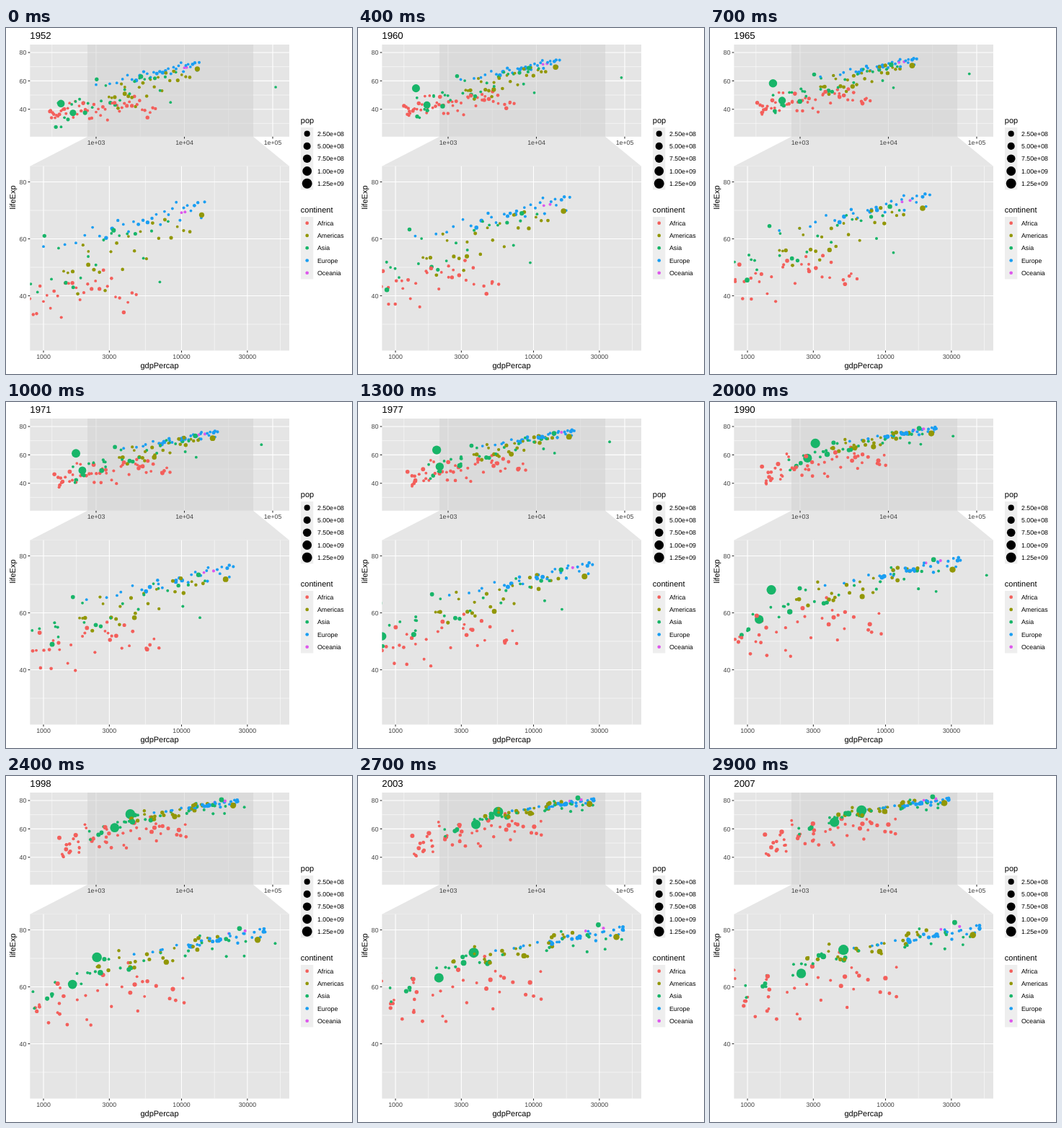
These frames come from a looping animation (480 by 480 pixels, 3000 ms). An HTML page:

```html
<!DOCTYPE html>
<html lang="en">
<head>
<meta charset="utf-8">
<title>Life expectancy and GDP</title>
<style>
html, body { margin: 0; width: 100%; height: 100%; overflow: hidden; background: #fff; }
svg { display: block; width: 480px; height: 480px; }
text {
  font-family: "Liberation Sans", Arial, Helvetica, sans-serif;
  font-size: 8.8px;
  text-rendering: geometricPrecision;
}
.axis { fill: #404040; }
.title { font-size: 11px; }
#year { font-size: 13.2px; }
</style>
</head>
<body>
<svg id="stage" viewBox="0 0 480 480"></svg>
<script>
const stage = document.getElementById('stage');
const LOOP = 3000, STEP = 100, STEPS = LOOP / STEP;
const FIRST = 1952, LAST = 2007;
const COLORS = {
  Africa: '#f35f5b', Americas: '#929706', Asia: '#18b569',
  Europe: '#1a9ef2', Oceania: '#dd58ec'
};

function add(tag, attrs, parent = stage, text) {
  const el = document.createElementNS('http://www.w3.org/2000/svg', tag);
  for (const k in attrs) el.setAttribute(k, attrs[k]);
  if (text !== undefined) el.textContent = text;
  parent.append(el);
  return el;
}
const rect = (x, y, width, height, fill) => add('rect', { x, y, width, height, fill });
const line = (x1, y1, x2, y2, stroke, w) =>
  add('line', { x1, y1, x2, y2, stroke, 'stroke-width': w });
const label = (x, y, s, cls = '', anchor = 'start') =>
  add('text', { x, y, class: cls, 'text-anchor': anchor }, stage, s);

// Panels: x from log10(gdp), y from life expectancy
const LEFT = 33.3, RIGHT = 393;
const full = {
  top: 23, bottom: 150.8, x: g => 125 + (g - 3) * 122.5, y: l => 112.7 - (l - 40) * 1.968
};
const zoom = {
  top: 191.8, bottom: 447.5, x: g => 52 + (g - 3) * 191.5, y: l => 371.5 - (l - 40) * 3.95
};

function drawPanel(p, major, minor, names) {
  rect(LEFT, p.top, RIGHT - LEFT, p.bottom - p.top, '#e5e5e5');
  const grid = (xs, ys, w) => {
    ys.forEach(l => line(LEFT, p.y(l), RIGHT, p.y(l), '#fff', w));
    xs.forEach(g => line(p.x(g), p.top, p.x(g), p.bottom, '#fff', w));
  };
  grid(minor, [30, 50, 70], 0.53);
  grid(major, [40, 60, 80], 1.07);
  major.forEach((g, i) => {
    line(p.x(g), p.bottom, p.x(g), p.bottom + 2.75, '#2a2a2a', 1.07);
    label(p.x(g), p.bottom + 11.6, names[i], 'axis', 'middle');
  });
  [40, 60, 80].forEach(l => {
    line(LEFT - 2.75, p.y(l), LEFT, p.y(l), '#2a2a2a', 1.07);
    label(28.4, p.y(l) + 3.2, l, 'axis', 'end');
  });
}

function clipGroup(id, p) {
  const clip = add('clipPath', { id });
  add('rect', { x: LEFT, y: p.top, width: RIGHT - LEFT, height: p.bottom - p.top }, clip);
  return add('g', { 'clip-path': `url(#${id})` });
}

add('polygon', {
  points: `113,${full.bottom} 343,${full.bottom} ${RIGHT},${zoom.top} ${LEFT},${zoom.top}`,
  fill: '#e6e6e6'
});
drawPanel(full, [3, 4, 5], [2.5, 3.5, 4.5], ['1e+03', '1e+04', '1e+05']);
add('rect', {
  x: 113, y: full.top, width: 230, height: full.bottom - full.top,
  fill: '#d0d0d0', 'fill-opacity': 0.5
});
const t3 = Math.log10(3);
drawPanel(zoom, [3, 3 + t3, 4, 4 + t3],
  [3 + t3 / 2, 3.5 + t3 / 2, 4 + t3 / 2, 4 + t3 * 1.5],
  ['1000', '3000', '10000', '30000']);

const year = add('text', { id: 'year', x: 33.3, y: 15 });
label(213, 472, 'gdpPercap', 'title', 'middle');
add('text', { class: 'title', 'text-anchor': 'middle', transform: 'translate(13 235) rotate(-90)' },
  stage, 'lifeExp');

// Population in millions to dot radius
const radius = pop => 1.77 + 5.33 * Math.sqrt(pop / 1318.7);

function legend(title, top, rows) {
  label(408.8, top - 6, title, 'title');
  rect(409, top, 17.28, 17.28 * rows.length, '#eeeeee');
  rows.forEach(([name, r, fill], i) => {
    const cy = top + 17.28 * (i + 0.5);
    add('circle', { cx: 417.7, cy, r, fill });
    label(432, cy + 3.2, name);
  });
}
legend('pop', 138, ['2.50e+08', '5.00e+08', '7.50e+08', '1.00e+09', '1.25e+09']
  .map(n => [n, radius(n / 1e6), '#000']));
legend('continent', 262, Object.entries(COLORS).map(([n, c]) => [n, 2.35, c]));

let seed = 1952;
function rand() {
  seed = (seed * 1664525 + 1013904223) % 4294967296;
  return seed / 4294967296;
}
const noise = () => 2 * (rand() + rand() + rand()) - 3;
const clamp = (v, lo, hi) => Math.max(lo, Math.min(hi, v));
const mix = (a, b, k) => a + (b - a) * k;
const logK = v => 3 + Math.log10(v);

// Each dot runs between two states; g and l each follow a power curve
const dots = [];
const addDot = (continent, from, to, gEase, lEase) =>
  dots.push({ fill: COLORS[continent], from, to, gEase, lEase, order: rand() });

// Crowd: [first, last] year of the poorest and richest gdp (thousands),
// their life expectancy, and the scatter around that line
const CROWD = {
  Africa: { n: 52, skew: 1.3, pop: 70, poor: [0.3, 0.4], rich: [4.7, 12],
    low: [37, 48], high: [43, 67], spread: [3.8, 6.5] },
  Americas: { n: 23, skew: 1.1, pop: 50, poor: [1.4, 2.7], rich: [11.5, 20],
    low: [45, 69], high: [65, 78], spread: [5, 2.3] },
  Asia: { n: 28, skew: 1.2, pop: 80, poor: [0.35, 0.95], rich: [8, 45],
    low: [39, 62], high: [61, 79], spread: [5.5, 2.6] },
  Europe: { n: 30, skew: 0.6, pop: 70, poor: [1, 5.9], rich: [14.7, 48],
    low: [57, 73.5], high: [72, 80.5], spread: [2, 1.1] },
  Oceania: { n: 2, skew: 1, pop: 10, poor: [10, 25.2], rich: [10.6, 34.4],
    low: [69.2, 80.2], high: [69.4, 81.2], spread: [0, 0] }
};
for (const [name, c] of Object.entries(CROWD)) {
  for (let i = 0; i < c.n; i++) {
    const rank = (i / (c.n - 1)) ** c.skew;
    const off = noise(), size = 1 + c.pop * rand() ** 4;
    const state = (end, shift, scatter, pop) => {
      const u = clamp(rank + shift, 0, 1);
      return {
        g: mix(logK(c.poor[end]), logK(c.rich[end]), u),
        l: mix(c.low[end], c.high[end], u) + scatter * c.spread[end],
        pop
      };
    };
    const shift = c.spread[0] && noise() * 0.06;
    addDot(name, state(0, 0, off, size * 0.6),
      state(1, shift, 0.6 * off + 0.7 * noise(), size * 1.4), 0.85, 0.75);
  }
}

// Giants and one far outlier: [first, last] population, gdp, life expectancy
const giant = (name, pop, gdp, life, gEase, lEase) => {
  const state = end => ({ g: logK(gdp[end]), l: life[end], pop: pop[end] });
  addDot(name, state(0), state(1), gEase, lEase);
};
giant('Asia', [556, 1319], [0.4, 4.96], [44, 73], 1.75, 0.5);
giant('Asia', [372, 1110], [0.547, 2.45], [37.4, 64.7], 1.7, 0.8);
giant('Asia', [82, 224], [0.75, 3.54], [37.5, 70.7], 1.2, 1);
giant('Asia', [86, 127], [3.22, 31.7], [63, 82.6], 0.45, 0.6);
giant('Asia', [0.2, 2.5], [108, 41], [55.6, 77.6], 0.9, 0.6);
giant('Americas', [158, 301], [14, 42.95], [68.4, 78.2], 0.97, 1);
giant('Americas', [57, 190], [2.11, 9.07], [50.9, 72.4], 0.6, 1);

dots.sort((a, b) => a.order - b.order);
const layers = [[full, clipGroup('clipFull', full)], [zoom, clipGroup('clipZoom', zoom)]];
for (const d of dots) {
  d.marks = layers.map(([p, g]) => [p, add('circle', { fill: d.fill }, g)]);
}

function draw(step) {
  const k = step / (STEPS - 1);
  year.textContent = Math.round(mix(FIRST, LAST, k));
  for (const { from, to, gEase, lEase, marks } of dots) {
    const g = mix(from.g, to.g, k ** gEase);
    const l = mix(from.l, to.l, k ** lEase);
    const r = radius(mix(from.pop, to.pop, k));
    for (const [p, el] of marks) {
      el.setAttribute('cx', p.x(g).toFixed(2));
      el.setAttribute('cy', p.y(l).toFixed(2));
      el.setAttribute('r', r.toFixed(2));
    }
  }
}

let shown = -1;
function tick() {
  const step = Math.floor((performance.now() % LOOP) / STEP);
  if (step !== shown) draw(shown = step);
  requestAnimationFrame(tick);
}
tick();
</script>
</body>
</html>
```
